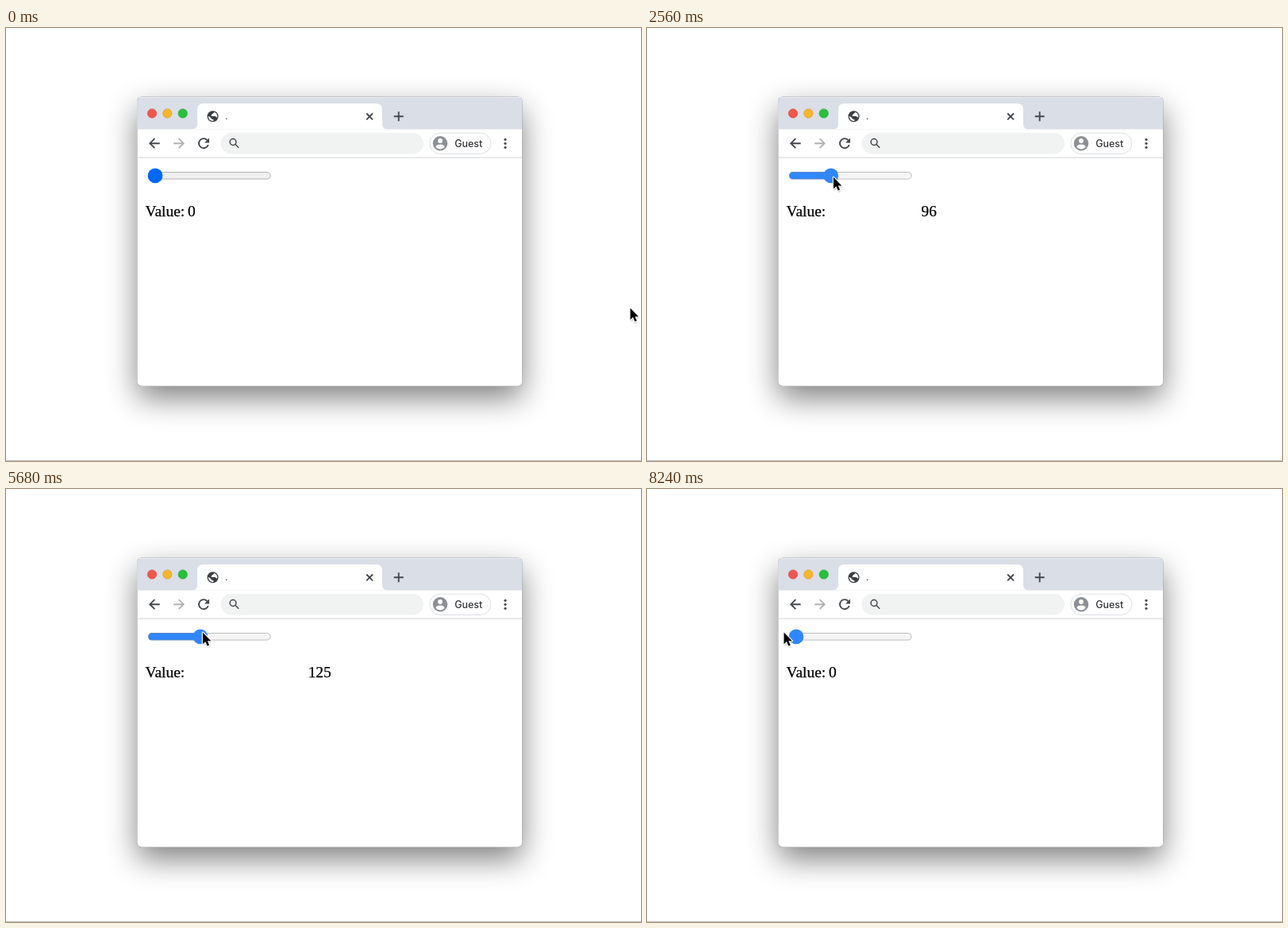
Recreate the animation shown at these times as an HTML page. Size 800x545 px, loop 8.8 s.

```html
<!DOCTYPE html>
<html lang="en">
<head>
<meta charset="utf-8">
<title>Range slider</title>
<style>
  html, body { margin: 0; width: 100%; height: 100%; overflow: hidden; background: #fff; }
  svg { display: block; width: 800px; height: 545px; }
  .ui { font-family: Inter, Roboto, sans-serif; }
  .page { font: 19.4px "Liberation Serif", "Times New Roman", serif; stroke: #000; stroke-width: .25; }
  .icon { fill: none; stroke: #45484d; stroke-width: 1.9; }
</style>
</head>
<body>
<svg viewBox="0 0 800 545" xmlns="http://www.w3.org/2000/svg">
  <defs>
    <filter id="soft" x="-30%" y="-30%" width="160%" height="160%"><feGaussianBlur stdDeviation="19"/></filter>
    <filter id="blur" x="-50%" y="-50%" width="200%" height="200%"><feGaussianBlur stdDeviation="1.1"/></filter>
    <clipPath id="frame"><rect x="165.5" y="87" width="484.5" height="363.5" rx="5"/></clipPath>
    <clipPath id="globe"><circle cx="260.5" cy="111.2" r="5.700"/></clipPath>
    <clipPath id="face"><circle cx="547" cy="145.2" r="9.2"/></clipPath>
    <clipPath id="bar"><rect x="179" y="181" width="154.6" height="9.6" rx="4.8"/></clipPath>
    <path id="arrow" d="M0 0V14.800L3.400 11.600 5.700 16.900 8.200 15.900 5.900 10.700H10.400Z"/>
  </defs>

  <rect width="800" height="545" fill="#fff"/>
  <rect y="544" width="800" height="1" fill="#bdbdbd"/>

  <!-- window -->
  <rect x="165.5" y="102" width="484.5" height="363.5" rx="6" opacity=".5" filter="url(#soft)"/>
  <rect x="165" y="86.5" width="485.5" height="364.5" rx="5.5" fill="#a3a5a8"/>
  <g clip-path="url(#frame)">
    <rect x="165" y="87" width="486" height="364" fill="#fff"/>
    <rect x="165" y="87" width="486" height="40.5" fill="#dadee7"/>
    <rect x="165" y="87" width="486" height="1" fill="#eceef3"/>
    <rect x="165" y="162.6" width="486" height="1" fill="#d3d4d6"/>
  </g>
  <path d="M234 127.5Q241 127.5 241 120.5V102.5Q241 95 248.5 95H466.5Q474 95 474 102.5V120.5Q474 127.5 481 127.5Z" fill="#fff"/>

  <g stroke-width=".8">
    <circle cx="184" cy="107.5" r="5.6" fill="#f0574e" stroke="#dc4a42"/>
    <circle cx="203.3" cy="107.5" r="5.6" fill="#fab52c" stroke="#dd9f2b"/>
    <circle cx="222.7" cy="107.5" r="5.6" fill="#28c13a" stroke="#22a832"/>
  </g>

  <!-- tab -->
  <circle cx="260.5" cy="111.2" r="7" fill="#3c4043"/>
  <g clip-path="url(#globe)" fill="#fff">
    <path d="M263 104.5Q262 108 259.5 108.5L258.5 111H263.5L267 113.5V104.5Z"/>
    <path d="M254 110.5Q258 112 259 114.5L261.5 115.5V118H254Z"/>
  </g>
  <text class="ui" x="276" y="115.3" font-size="12" fill="#333">.</text>
  <path class="icon" d="M454.200 107.500l7.800 7.800m0-7.800l-7.800 7.800"/>
  <path class="icon" d="M488.700 111.300h12m-6-6v12"/>

  <!-- toolbar -->
  <path class="icon" d="M193.700 145.200H181.500M187.300 139.200l-6 6 6 6"/>
  <path class="icon" style="stroke:#b1b2b4" d="M211.200 145.200h12.200M217.600 139.200l6 6-6 6"/>
  <path class="icon" d="M253.400 141.100A6 6 0 1 0 254.700 147"/>
  <path d="M256 138.500V144.500H250Z" fill="#45484d"/>
  <rect x="270.5" y="132" width="255.5" height="26.5" rx="13.25" fill="#f1f2f2"/>
  <g class="icon" style="stroke-width:1.5">
    <circle cx="286" cy="143.5" r="3.9"/>
    <path d="M288.800 146.300l4.400 4.400"/>
  </g>
  <rect x="533.8" y="132.2" width="77" height="26.2" rx="13.1" fill="#fff" stroke="#dcdee2"/>
  <circle cx="547" cy="145.2" r="9.2" fill="#8b8f96"/>
  <g clip-path="url(#face)" fill="#fff">
    <circle cx="547" cy="142" r="2.9"/>
    <path d="M541.400 149.800Q542 146.600 547 146.600T552.600 149.800Q550.500 152.400 547 152.400T541.400 149.800Z"/>
  </g>
  <text class="ui" x="565.3" y="149.8" font-size="12.4" font-weight="500" fill="#333539">Guest</text>
  <g fill="#4a4d51">
    <circle cx="629" cy="140.3" r="1.6"/>
    <circle cx="629" cy="145.3" r="1.6"/>
    <circle cx="629" cy="150.3" r="1.6"/>
  </g>

  <!-- page -->
  <g clip-path="url(#bar)">
    <rect id="track" x="179" y="181" width="155" height="9.6"/>
    <rect id="fill" x="179" y="181" height="9.6"/>
  </g>
  <rect id="edge" x="179.5" y="181.5" width="153.6" height="8.6" rx="4.3" fill="none" stroke-opacity=".5"/>
  <circle id="thumb" cy="185.9" r="9.4"/>
  <text class="page" x="175.6" y="237.3">Value:</text>
  <text class="page" id="num" y="237.3">0</text>

  <g id="cursor">
    <use href="#arrow" x=".5" y="1.8" opacity=".4" filter="url(#blur)"/>
    <use href="#arrow" fill="#000" stroke="#fff" stroke-width="2.2" stroke-linejoin="round" style="paint-order:stroke"/>
  </g>
</svg>
<script>
  const LOOP = 8800, STEP = 40, HOVER = 1000, PRESS = 1680;
  const $ = id => document.getElementById(id);
  const [track, fill, edge, thumb, num, cursor] =
    ['track', 'fill', 'edge', 'thumb', 'num', 'cursor'].map($);

  const rest = { value: 0, x: 786.5, y: 352.5 };

  // Each hand movement eases from the previous pose to its own; bend > 1 starts slower
  const moves = [
    { from: 40, to: 1160, value: 0, x: 190.8, y: 188.5 },
    { from: 1680, to: 3240, value: 300, x: 328.5, y: 186, bend: 1.7 },
    { from: 3750, to: 4980, value: 0, x: 175.5, y: 175 },
    { from: 5190, to: 6035, value: 202, x: 292.5, y: 184 },
    { from: 6440, to: 6700, value: 206, x: 284, y: 180.5 },
    { from: 6980, to: 8060, value: 0, x: 172.5, y: 180.5 },
  ];

  const idle = { blue: '#0068ff', grey: '#efefef', line: '#767676' };
  const hover = { blue: '#0051c2', grey: '#e3e3e3', line: '#4f4f4f' };
  const active = { blue: '#3187ff', grey: '#f5f5f5', line: '#858585' };

  const smooth = s => s * s * (3 - 2 * s);

  function poseAt(t) {
    const pose = { ...rest };
    for (const m of moves) {
      if (t <= m.from) break;
      const s = Math.min(1, (t - m.from) / (m.to - m.from));
      const e = smooth(s ** (m.bend || 1));
      for (const key in pose) pose[key] += (m[key] - pose[key]) * e;
    }
    return pose;
  }

  function draw(time) {
    const t = Math.floor(time % LOOP / STEP) * STEP;
    const { value, x, y } = poseAt(t);
    const shown = Math.round(value);
    const pos = 188 + shown * 0.455;
    const { blue, grey, line } = t < HOVER ? idle : t < PRESS ? hover : active;

    track.setAttribute('fill', grey);
    edge.setAttribute('stroke', line);
    fill.setAttribute('fill', blue);
    fill.setAttribute('width', pos - 179);
    thumb.setAttribute('fill', blue);
    thumb.setAttribute('cx', pos);
    num.setAttribute('x', 229 + shown * 1.213);
    num.textContent = shown;
    cursor.setAttribute('transform', `translate(${x} ${y})`);
  }

  const start = performance.now();
  function tick() {
    draw(performance.now() - start);
    requestAnimationFrame(tick);
  }
  tick();
</script>
</body>
</html>
```
